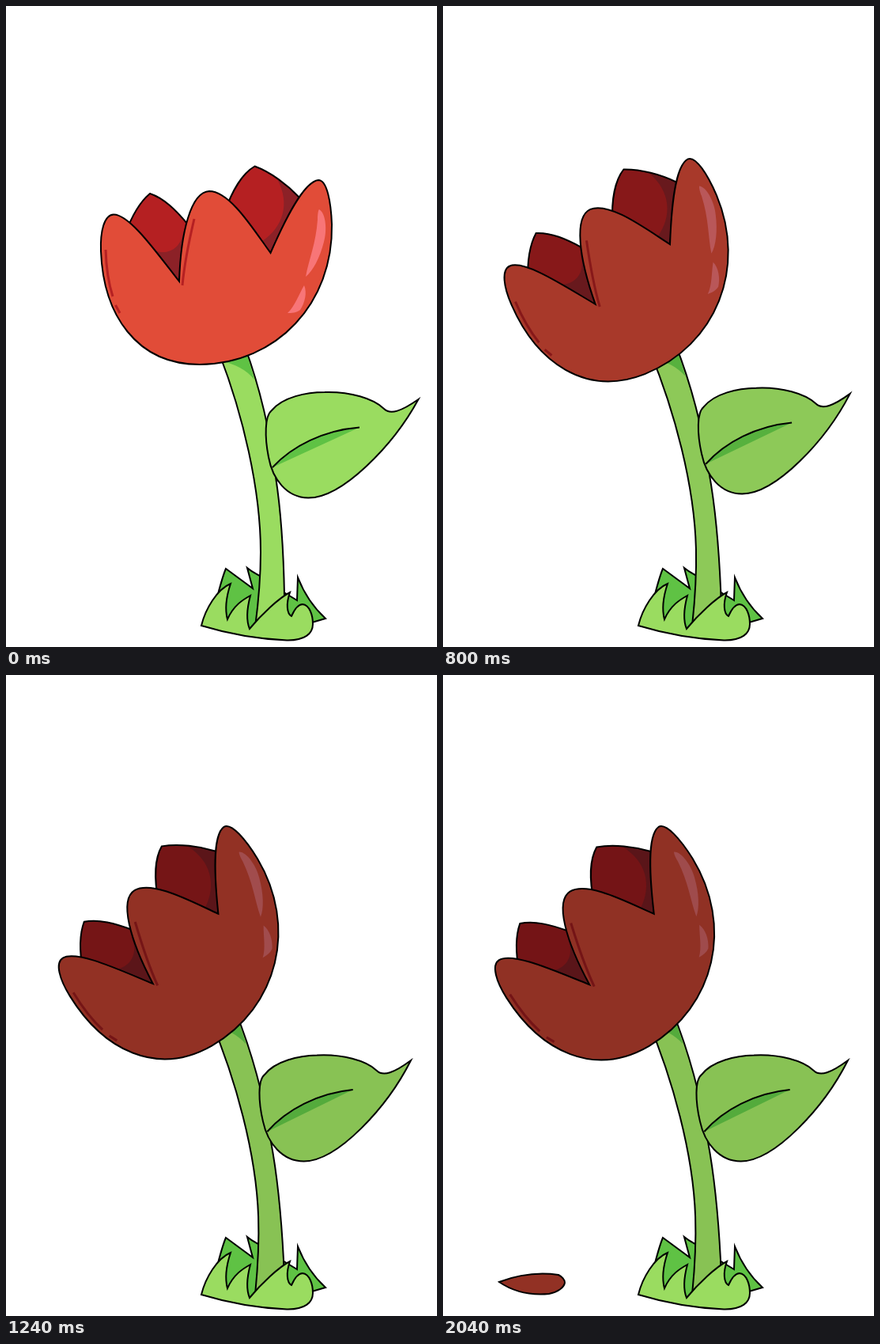
These frames come from a looping animation (545x810 px, 2440 ms). An HTML page with a canvas:

```html
<!DOCTYPE html>
<html lang="en">
<head>
<meta charset="utf-8">
<title>Wilting tulip</title>
<style>
  html, body { margin: 0; width: 545px; height: 810px; overflow: hidden; background: #fff; }
  canvas { display: block; }
</style>
</head>
<body>
<canvas id="stage" width="545" height="810"></canvas>
<script>
const ctx = document.getElementById('stage').getContext('2d');
const LOOP = 2440, STEP = 40;

const RED = [225, 76, 56], CRIMSON = [181, 32, 34], MAROON = [140, 33, 39], PINK = [248, 117, 119];
const LIGHT = [154, 220, 96], DARK = [95, 194, 68];

const shape = d => new Path2D(d);

const backGrass = [
  shape('M262,765C268,745 272,725 278,711L312,736L305,710C312,716 318,718 324,722L330,790H275Z'),
  shape('M345,737L368,751L369,722C378,745 392,763 404,774L380,781L350,785Z')
];
const frontGrass = shape('M247,783C252,762 267,737 284,730C279,745 276,760 280,775C288,757 300,750 309,745' +
  'C305,760 303,775 308,787C322,770 345,748 359,741C354,755 355,768 361,771C365,762 370,756 375,756' +
  'C384,757 388,770 388,781C388,793 378,802 355,801.5C320,800 280,793 247,783Z');

const stem = shape('M270,440C299,515 322,610 322,690C322,725 319,755 315,785V792H352V745' +
  'C351,690 348,640 341,595C335,545 322,485 302,430Z');
const stemShade = shape('M272,449C290,452 304,460 314,472L302,430L268,435Z');
const leaf = shape('M336,511C350,494 380,488 403,488C435,487 465,496 478,509C486,517 500,512 521.5,497' +
  'C490,555 425,622 382,621.5C355,621 337,598 332,570C327,545 327,518 336,511Z');
const vein = shape('M337,583C362,556 402,536 447,532.5');

const cup = shape('M219,348C190,311 156,263 136,263.5C124,264 119,285 120,310C123,390 165,453 245,453' +
  'C343,452 414,375 412,276C411,248 406,220 395,220C376,222 352,272 334.5,312' +
  'C312,281 283,234 257,234C234,235 221,285 219,348Z');
const innerPetals = [
  [shape('M150,290C160,262 170,247 182,237C200,243 215,258 230,276L219,348Z'),
   shape('M188,309C205,316 222,305 224,286L229,276L219,348Z')],
  [shape('M276,262C286,232 300,211 314.5,202.5C335,210 356,226 371,242L334.5,312Z'),
   shape('M343,219L371,242L334.5,312L324,297C350,280 360,250 343,219Z')]
];
const shine = shape('M396,257C405,262 406,285 402,298C397,318 388,335 379,342C383,320 392,300 394,270' +
  'C394,262 395,258 396,257ZM377,353C381,362 378,375 372,384C367,388 361,388 356,388C365,380 370,365 377,353Z');
const creases = shape('M126,308Q127,342 135,367M138.5,378L144,388M238,269Q226,320 223,353');

// Relative to the petal's centre, lying on the ground
const petal = shape('M-41,-2C-12,-13 13,-14 34,-11C38,-9 42,-5 42,-1C41,5 33,11 22,13C0,15 -22,11 -41,-2Z');

const clamp = x => Math.min(1, Math.max(0, x));
const progress = (t, start, end) => clamp((t - start) / (end - start));
const easeOut = (u, power) => 1 - (1 - u) ** power;
const radians = degrees => degrees * Math.PI / 180;
const tint = (rgb, level) => `rgb(${rgb.map(c => Math.round(c * level))})`;

function fill(path, rgb, level = 1) {
  ctx.fillStyle = tint(rgb, level);
  ctx.fill(path);
}

function outline(path, color = '#000', width = 2) {
  ctx.strokeStyle = color;
  ctx.lineWidth = width;
  ctx.stroke(path);
}

function solid(path, rgb, level) {
  fill(path, rgb, level);
  outline(path);
}

function layer(paint) {
  ctx.save();
  paint();
  ctx.restore();
}

// Tumbles while it drops, and flattens as it lands
function drawPetal(t) {
  if (t < 1120) return;
  const fall = progress(t, 1120, 1640), settle = easeOut(progress(t, 1640, 2040), 3);
  const left = 1 - progress(t, 1120, 2040);
  const pose = new DOMMatrix()
    .translate(190 - 73 * fall - 5 * settle, 402 + 255 * fall ** 1.7 + 112 * settle)
    .rotate(left * 270)
    .scale(1 - 0.21 * left, 1 + 0.87 * left);
  const posed = new Path2D();
  posed.addPath(petal, pose);
  solid(posed, RED, 0.65 + 0.25 * left);
}

function drawStem(t) {
  const bend = easeOut(progress(t, 560, 1080), 2), level = 1 - 0.12 * bend;
  const sx = 0.0343 * bend, sy = 0.0217 * bend;
  ctx.transform(1, -sy, sx, 1, -775 * sx, 60 * sy);
  fill(stem, LIGHT, level);
  layer(() => {
    ctx.clip(stem);
    fill(stemShade, DARK, level);
  });
  outline(stem);
  solid(leaf, LIGHT, level);
  fill(vein, DARK, level);
  outline(vein);
}

function drawHead(t) {
  const droop = easeOut(progress(t, 560, 1600), 3) ** 0.57, level = 1 - 0.36 * droop;
  ctx.translate(282, 432);
  ctx.rotate(radians(-30.3 * droop));
  ctx.translate(-282, -432);
  for (const [body, shade] of innerPetals) {
    fill(body, CRIMSON, level);
    fill(shade, MAROON, level);
    outline(body);
  }
  solid(cup, RED, level);
  fill(shine, PINK, level);
  outline(creases, tint(CRIMSON, level), 3);
}

function frame(now) {
  const t = Math.floor(now % LOOP / STEP) * STEP;
  ctx.fillStyle = '#fff';
  ctx.fillRect(0, 0, 545, 810);
  layer(() => drawPetal(t));
  backGrass.forEach(blade => solid(blade, DARK));
  layer(() => drawStem(t));
  solid(frontGrass, LIGHT);
  layer(() => drawHead(t));
  requestAnimationFrame(frame);
}
requestAnimationFrame(frame);
</script>
</body>
</html>
```
